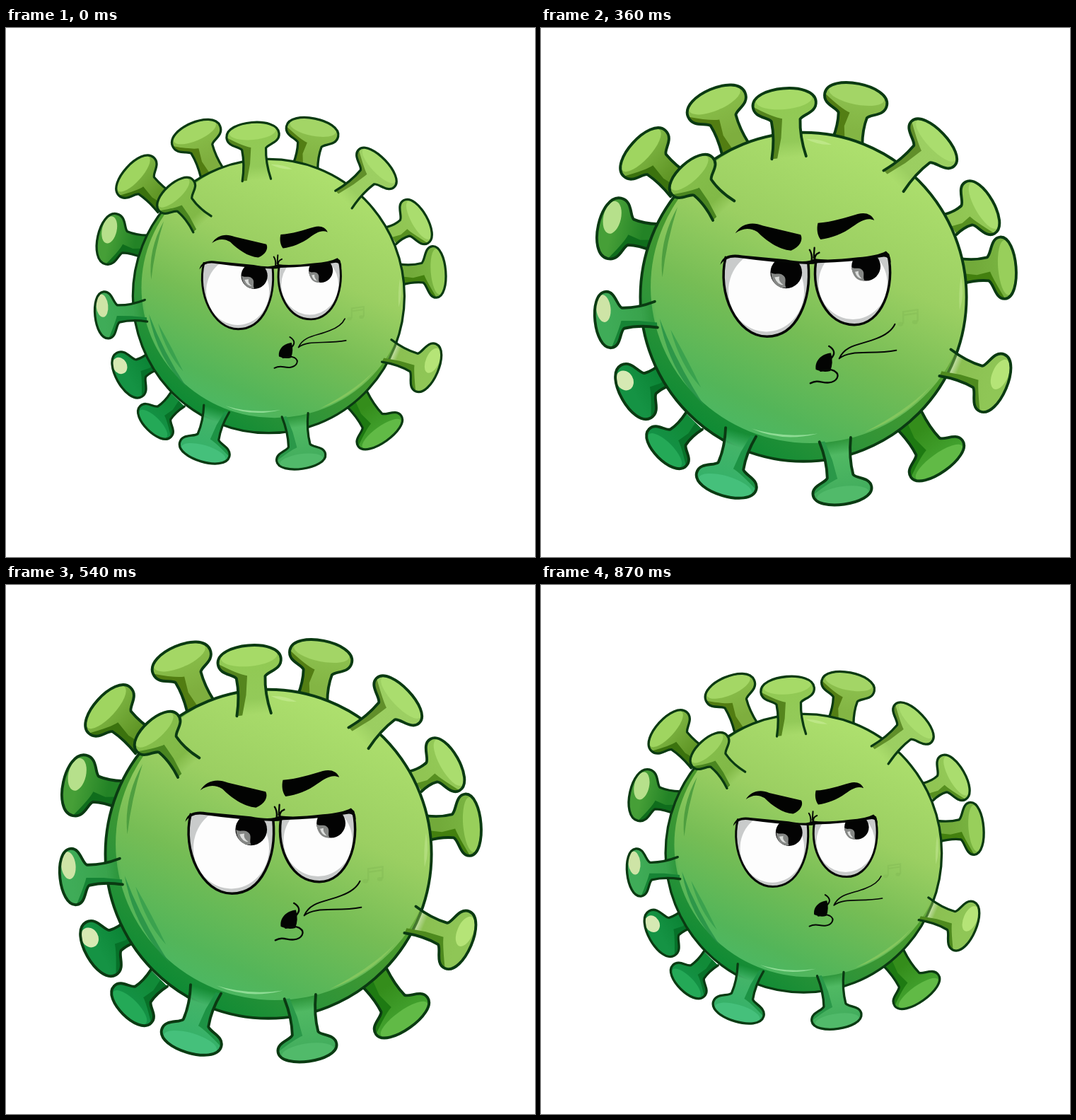
Recreate the animation shown at these times as an HTML page. Size 748 by 748 pixels, loop 0.9 s.

```html
<!DOCTYPE html>
<html lang="en">
<head>
<meta charset="utf-8">
<title>Pulsing virus</title>
<style>
html, body { margin: 0; width: 100%; height: 100%; overflow: hidden; background: #fff; }
svg { display: block; width: 100vw; height: 100vh; }
.ink { fill: none; stroke: #0a3a12; stroke-width: 4; stroke-linecap: round; stroke-linejoin: round; }
.line { fill: none; stroke: #050805; stroke-width: 2.4; stroke-linecap: round; stroke-linejoin: round; }
</style>
</head>
<body>
<svg viewBox="0 0 748 748">
  <defs>
    <linearGradient id="skin" gradientUnits="userSpaceOnUse" x1="470" y1="160" x2="270" y2="600">
      <stop offset="0" stop-color="#aee06e"/>
      <stop offset=".35" stop-color="#9bcf62"/>
      <stop offset=".6" stop-color="#76bd55"/>
      <stop offset=".85" stop-color="#53b559"/>
      <stop offset="1" stop-color="#48b968"/>
    </linearGradient>
    <linearGradient id="rim" gradientUnits="userSpaceOnUse" x1="520" y1="230" x2="260" y2="600">
      <stop offset="0" stop-color="#8cc455"/>
      <stop offset=".45" stop-color="#4a9a2c"/>
      <stop offset=".75" stop-color="#2f9438"/>
      <stop offset="1" stop-color="#0d8a34"/>
    </linearGradient>
    <clipPath id="bodyClip"><ellipse cx="371" cy="380.5" rx="237" ry="239"/></clipPath>
    <clipPath id="eyeL"><path d="M258 323C285 320 340 327 378 331C383 385 362 438 318 438C274 438 245 375 258 323Z"/></clipPath>
    <clipPath id="eyeR"><path d="M389 330C420 327 465 325 494 319C505 365 485 421 445 421C405 421 383 375 389 330Z"/></clipPath>
  </defs>
  <g id="virus">
    <g id="back"></g>
    <g clip-path="url(#bodyClip)">
      <rect x="120" y="130" width="500" height="500" fill="url(#rim)"/>
      <ellipse cx="381" cy="366" rx="232" ry="227" fill="url(#skin)"/>
      <path d="M188 250Q160 300 166 352Q172 300 188 250Z" fill="#43963a" opacity=".8"/>
      <path d="M162 412Q176 490 228 540Q188 480 162 412Z" fill="#249045" opacity=".8"/>
      <path d="M178 428Q192 480 222 512Q202 470 178 428Z" fill="#2f9a4a" opacity=".7"/>
      <path d="M296 572Q340 586 392 579Q340 592 296 572Z" fill="#8fdc95"/>
      <path d="M460 577Q520 556 556 510Q522 545 460 577Z" fill="#90cc62" opacity=".7"/>
      <path d="M375 151Q395 150 412 159Q392 160 375 151Z" fill="#c5eb92" opacity=".7"/>
      <path d="M600 350Q606 375 598 400Q596 375 600 350Z" fill="#bfe58c" opacity=".6"/>
    </g>
    <ellipse class="ink" cx="371" cy="380.5" rx="237" ry="239"/>
    <g id="front"></g>
    <g id="face">
      <path d="M272 288C280 275 295 270 312 277L367 290C371 297 366 308 353 313C335 312 317 299 304 286C292 279 282 281 272 288Z" fill="#020302"/>
      <path d="M392 273C412 272 432 265 450 260C461 257 470 260 474 269C463 264 453 271 443 278C428 289 412 295 396 297C391 291 390 281 392 273Z" fill="#020302"/>
      <g clip-path="url(#eyeL)">
        <rect x="245" y="310" width="140" height="135" fill="#c9cbcb"/>
        <ellipse cx="317" cy="372" rx="55" ry="59" fill="#fdfdfd"/>
        <ellipse cx="346" cy="345" rx="23" ry="23" fill="#030303"/>
        <path d="M324 345C325 361 334 368 346 367C342 361 349 353 340 348C334 345 329 349 324 345Z" fill="#858785"/>
        <path d="M329 352Q333 363 342 363Q334 358 336 351Z" fill="#dcdedc"/>
      </g>
      <path class="line" style="stroke-width:3.6" d="M258 323C245 375 274 438 318 438C362 438 383 385 378 331"/>
      <g clip-path="url(#eyeR)">
        <rect x="380" y="310" width="125" height="120" fill="#c9cbcb"/>
        <ellipse cx="443" cy="361" rx="50" ry="52" fill="#fdfdfd"/>
        <ellipse cx="462" cy="336" rx="21" ry="21" fill="#030303"/>
        <path d="M441 337C442 351 450 358 460 357C456 351 462 345 455 340C449 337 446 341 441 337Z" fill="#858785"/>
        <path d="M446 344Q449 354 456 354Q450 349 451 343Z" fill="#dcdedc"/>
      </g>
      <path class="line" style="stroke-width:3.6" d="M389 330C383 375 405 421 445 421C485 421 505 365 494 319"/>
      <path d="M250 334C253 320 266 317 282 320L345 326Q376 332 387 325Q410 328 450 323Q478 321 491 314Q498 319 498 331Q495 322 488 322Q440 330 392 331Q386 333 378 333Q330 331 280 324Q259 320 250 334Z" fill="#040604"/>
      <path class="line" d="M380 312Q384 318 383 327M394 316Q386 319 388 327M387 309L386 324"/>
      <path d="M411 462C398 463 387 473 389 486Q400 491 410 488Q415 476 411 462Z" fill="#030403"/>
      <path class="line" d="M408 452Q421 460 411 470M396 488Q408 484 416 488C426 494 419 504 408 505C397 506 393 500 381 506"/>
      <path class="line" style="stroke-width:2" d="M423 470C432 449 456 450 477 441Q498 433 504 420M423 470C440 456 470 465 506 458"/>
      <path d="M516 419V402L537 399V416M516 407L537 404" fill="none" stroke="#71a947" stroke-width="2.5" opacity=".22"/>
      <path d="M508 420a4 3 0 1 0 8 0a4 3 0 1 0-8 0M529 417a4 3 0 1 0 8 0a4 3 0 1 0-8 0" fill="#71a947" opacity=".22"/>
    </g>
  </g>
</svg>
<script>
const $ = id => document.getElementById(id);
let count = 0;

// Each spike: cap x, y, root x, y, cap half-width, cap depth, stem half-width,
// face, cap edge, stem and shade colours, shaded side, spot offset, spot radius.
const back = [
  [243, 97, 272, 165, 45, 22, 19, '#a4d765', '#88bd49', '#7eae3e', '#527d12', -1],
  [448, 89, 435, 155, 46, 21, 20, '#a3d566', '#8cc04e', '#83b544', '#537e14', -1],
  [631, 249, 585, 275, 43, 19, 15, '#aadd6e', '#93c957', '#90c553', '#568f20', 1],
  [664, 338, 602, 343, 45, 18, 16, '#98cf5b', '#79b441', '#72aa3a', '#43800f', 1],
  [567, 619, 525, 560, 46, 19, 20, '#61ba46', '#43a22f', '#348d1b', '#1e7a12', 1],
  [171, 602, 212, 561, 38, 18, 15, '#24a957', '#149247', '#118b38', '#087229', -1],
  [124, 520, 175, 491, 44, 21, 16, '#d6e9b3', '#159344', '#0c8536', '#067129', -1, 22, 15],
  [92, 280, 155, 294, 45, 22, 18, '#b6e08b', '#469f37', '#238326', '#0f6d1c', -1, 15, 24],
  [137, 169, 192, 219, 45, 21, 19, '#9fd560', '#7db442', '#609626', '#3b720e', -1]
];
const front = [
  [343, 96, 350, 178, 46, 21, 20, '#a6da67', '#91c953', '#93ca59', '#55851e', -1],
  [562, 155, 502, 212, 45, 19, 16, '#aadd6e', '#9ccf62', '#9bce61', '#618f2a', -1],
  [649, 507, 577, 476, 45, 20, 16, '#b5e477', '#8fc656', '#8bc052', '#4e8a1e', 1, -16, 23],
  [428, 666, 417, 588, 43, 18, 18, '#51ba6a', '#42ad5d', '#50b963', '#2a9849', 1],
  [258, 652, 280, 577, 45, 20, 18, '#45c07b', '#35b169', '#43b468', '#1d9345', -1],
  [84, 414, 157, 406, 41, 18, 14, '#cee4a6', '#3fac58', '#39a34c', '#168435', -1, 17, 20],
  [207, 202, 255, 255, 40, 19, 16, '#9fd463', '#84bd4a', '#81b947', '#4a8620', -1]
];

function spike(p, open) {
  const [x, y, bx, by, w, h, s, face, edge, stem, shade, side, off, spot] = p;
  const dx = bx - x, dy = by - y, len = Math.hypot(dx, dy);
  const turn = Math.atan2(-dx, dy) * 180 / Math.PI;
  const id = 's' + count++;
  const neck = h + 3, mid = (neck + len) / 2, flare = s + (open ? 5 : 2);
  const d = `M${-flare} ${len}Q${-s + 2} ${mid} ${-s - 1} ${neck + 4}` +
    `C${-s - 5} ${neck - 3} ${-w} ${h} ${-w} ${h * .2}` +
    `C${-w} ${-h * 1.25} ${w} ${-h * 1.25} ${w} ${h * .2}` +
    `C${w} ${h} ${s + 5} ${neck - 3} ${s + 1} ${neck + 4}Q${s - 2} ${mid} ${flare} ${len}`;
  const dark = `M${side * w} ${h * .2}Q${side * s * .9} ${h * 1.05} ${side * s * .25} ${neck + 1}` +
    `L${side * s * .45} ${mid}L${side * (open ? s * .85 : s * .2)} ${len}H${side * (w + 5)}Z`;
  const fade = open ? 0 : 1;
  const light = off === undefined
    ? `<ellipse cx="0" cy="${-h * .12}" rx="${w - 5}" ry="${h * .68}" fill="${face}"/>`
    : `<ellipse cx="${off}" cy="${-h * .1}" rx="${spot}" ry="${h * .58}" fill="${face}"/>`;
  return `<g transform="translate(${x} ${y}) rotate(${turn})">
    <linearGradient id="${id}g" gradientUnits="userSpaceOnUse" x1="0" y1="0" x2="0" y2="${len}">
      <stop offset="0" stop-color="${edge}"/><stop offset=".72" stop-color="${stem}"/>
      <stop offset="1" stop-color="${stem}" stop-opacity="${fade}"/></linearGradient>
    <clipPath id="${id}c"><path d="${d}"/></clipPath>
    <path d="${d}" fill="url(#${id}g)"/>
    <g clip-path="url(#${id}c)"><path d="${dark}" fill="${shade}"/>${light}</g>
    <path class="ink" d="${d}"/></g>`;
}

$('back').innerHTML = back.map(p => spike(p, false)).join('');
$('front').innerHTML = front.map(p => spike(p, true)).join('');

// The zoom moves in 30 ms steps: fifteen up, fifteen down.
function draw(ms) {
  const step = Math.floor(ms % 900 / 30);
  const scale = 1.01355 - .01355 * Math.abs(step - 15);
  $('virus').setAttribute('transform', `translate(373 373) scale(${scale}) translate(-373 -373)`);
}

const start = performance.now();
function tick() {
  draw(performance.now() - start);
  requestAnimationFrame(tick);
}
tick();
</script>
</body>
</html>
```
